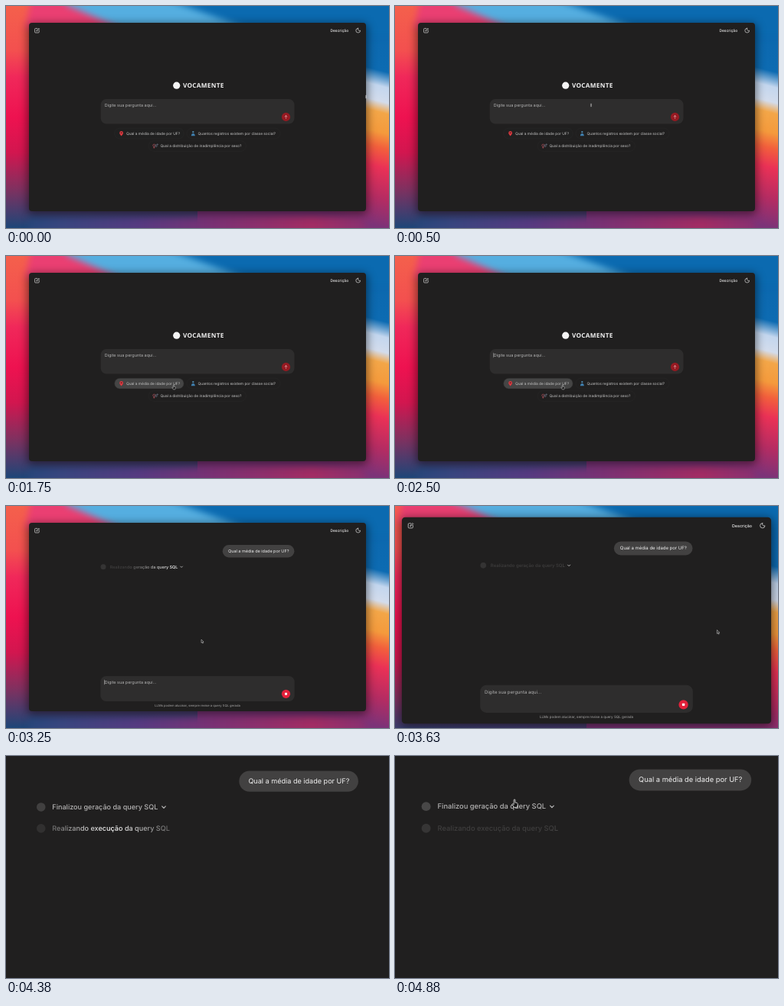
An HTML page for the animation above (5010 ms loop, 500 by 291 pixels).

```html
<!DOCTYPE html>
<html lang="pt-BR">
<head>
<meta charset="utf-8">
<title>Chat</title>
<style>
  html, body { margin: 0; width: 100%; height: 100%; overflow: hidden; background: #201f1f; }
  svg { display: block; width: 100%; height: 100%; overflow: hidden; fill: none; }
  text { font: 5.47px Inter, sans-serif; text-rendering: geometricPrecision; fill: #f0f0f0; white-space: pre; }
  .chip text { font-size: 4.83px; fill: #c6c6c6; }
  .chip rect { fill: #201f1f; stroke: #2b2a2a; stroke-width: .5; }
  .hint { fill: #b2b2b2; }
  .status { font-weight: 500; }
  .line { stroke: #d8d8d8; stroke-width: .7; stroke-linecap: round; stroke-linejoin: round; }
  .box { fill: #2e2d2d; }
  .soft { filter: blur(4px); }
  .shadow { filter: blur(6px); }
  #mouse path { stroke-linejoin: round; }
</style>
</head>
<body>
<svg viewBox="0 0 500 291">
  <defs>
    <linearGradient id="left" gradientUnits="userSpaceOnUse" x1="0" y1="0" x2="0" y2="291">
      <stop offset="0" stop-color="#f4604c"/>
      <stop offset=".2" stop-color="#f3504f"/>
      <stop offset=".32" stop-color="#f0285a"/>
      <stop offset=".5" stop-color="#ee1250"/>
      <stop offset=".66" stop-color="#d2164f"/>
      <stop offset=".82" stop-color="#82305f"/>
      <stop offset="1" stop-color="#1d4678"/>
    </linearGradient>
    <linearGradient id="right" gradientUnits="userSpaceOnUse" x1="485" y1="0" x2="415" y2="270">
      <stop offset="0" stop-color="#0b66ac"/>
      <stop offset=".29" stop-color="#0d6bb2"/>
      <stop offset=".36" stop-color="#c3d6ee"/>
      <stop offset=".43" stop-color="#d3dcec"/>
      <stop offset=".48" stop-color="#f3a648"/>
      <stop offset=".57" stop-color="#f49a3c"/>
      <stop offset=".64" stop-color="#f2603c"/>
      <stop offset=".73" stop-color="#ea3156"/>
      <stop offset=".87" stop-color="#b52c62"/>
      <stop offset="1" stop-color="#7c3378"/>
    </linearGradient>
    <linearGradient id="bottom" gradientUnits="userSpaceOnUse" x1="0" y1="0" x2="500" y2="0">
      <stop offset="0" stop-color="#1d4678"/>
      <stop offset=".15" stop-color="#39457f"/>
      <stop offset=".35" stop-color="#563a80"/>
      <stop offset=".55" stop-color="#7b3173"/>
      <stop offset=".8" stop-color="#a22c63"/>
      <stop offset="1" stop-color="#7c3378"/>
    </linearGradient>
    <linearGradient id="shine">
      <stop offset="0" stop-color="#3e3d3d"/>
      <stop offset=".5" stop-color="#fff"/>
      <stop offset="1" stop-color="#3e3d3d"/>
    </linearGradient>
  </defs>

  <g id="cam">
    <path d="M-20-20h270v331h-270z" fill="url(#left)"/>
    <path d="M250-20h270v331h-270z" fill="url(#right)"/>
    <g class="soft">
      <path d="M30 276h440v40h-440z" fill="url(#bottom)"/>
      <path d="M35-20h80l50 50H25z" fill="#ea3f72"/>
      <path d="M60-20L82 0l70 30h200V-20z" fill="#55aee0"/>
      <path d="M180-20L310 28l160 12h50v-60z" fill="#0b6ab0"/>
    </g>
    <rect class="shadow" x="28" y="23" width="444" height="250" rx="6" fill="#000" fill-opacity=".5"/>
    <rect x="30" y="22" width="440" height="247" rx="4" fill="#201f1f"/>

    <g class="line">
      <path d="M40.6 29.4h-2a1 1 0 0 0-1 1v3.6a1 1 0 0 0 1 1h3.6a1 1 0 0 0 1-1v-2"/>
      <path d="M40 32.7l.3-1.2 2.4-2.4.9.9-2.4 2.4z"/>
      <path d="M459.6 29.2a2.3 2.3 0 0 0 3 3 2.9 2.9 0 1 1-3-3z"/>
    </g>
    <text x="423.4" y="33.8" style="font-size:4.92px;font-weight:500">Descrição</text>

    <g id="home">
      <circle cx="222.7" cy="104.2" r="4.6" fill="#f4f4f4"/>
      <text x="231" y="107.1" style="font:600 8.2px 'Noto Sans',sans-serif;letter-spacing:.3px">VOCAMENTE</text>
      <rect class="box" x="123.7" y="122" width="252.8" height="32.4" rx="7.5"/>
      <text class="hint" x="128.7" y="131.8">Digite sua pergunta aqui...</text>
      <path id="caretA" d="M128.6 126.8v6.4" stroke="#bbb" stroke-width=".5"/>
      <circle cx="365.5" cy="145.4" r="5.6" fill="#961a22"/>
      <path d="M365.5 147.4v-3.8m-1.6 1.5l1.6-1.6 1.6 1.6" class="line" style="stroke:#e2a3a6"/>

      <g class="chip">
        <rect id="hover" x="141.6" y="160.2" width="90.6" height="13.8" rx="6.9"/>
        <path d="M150.6 170.6c-.5-1.5-2.4-2.4-2.4-4.2a2.4 2.4 0 0 1 4.8 0c0 1.8-1.9 2.7-2.4 4.2z" fill="#dd3a40"/>
        <circle cx="150.6" cy="166.3" r="1" fill="#6e2226"/>
        <text x="157" y="168.9">Qual a média de idade por UF?</text>
      </g>
      <g class="chip">
        <rect x="236" y="160.2" width="122" height="13.8" rx="6.9"/>
        <circle cx="244.3" cy="165.1" r="1.2" fill="#4f86a8"/>
        <path d="M241.8 170.2q.4-3.3 2.5-3.3t2.5 3.3z" fill="#3f7fae"/>
        <text x="250.6" y="168.9">Quantos registros existem por classe social?</text>
      </g>
      <g class="chip">
        <rect x="186" y="176.8" width="127.4" height="13.6" rx="6.8"/>
        <g stroke-width=".7">
          <path d="M193.3 184.2v2.4m-1-1h2" stroke="#b5525c"/>
          <circle cx="193.3" cy="182.7" r="1.5" stroke="#b5525c"/>
          <circle cx="196" cy="183.2" r="1.3" stroke="#6f7688"/>
          <path d="M197 182.2l1.2-1.2m-1.1 0h1.1v1.1" stroke="#6f7688"/>
        </g>
        <text x="201.4" y="185.3">Qual a distribuição de inadimplência por sexo?</text>
      </g>
    </g>

    <g id="chat">
      <rect x="282.7" y="51.1" width="93.7" height="16.4" rx="8.2" fill="#424141"/>
      <text x="290" y="61.1">Qual a média de idade por UF?</text>
      <circle id="dotA" cx="127" cy="79.7" r="3.5" fill="#fff"/>
      <g id="running">
        <text class="status" x="135.8" y="81.6" style="fill:url(#shine)">Realizando geração da query SQL</text>
        <path class="line" d="M227.7 79.1l1.4 1.4 1.4-1.4"/>
      </g>
      <g id="done">
        <text class="status" x="135.8" y="81.6" style="fill:#b4b3b3">Finalizou geração da query SQL</text>
        <path class="line" d="M222.1 79.1l1.4 1.4 1.4-1.4" style="stroke:#b4b3b3"/>
        <circle id="dotB" cx="127" cy="96.5" r="3.5" fill="#fff"/>
        <text class="status" x="135.8" y="98.3" style="fill:url(#shine)">Realizando execução da query SQL</text>
      </g>
      <rect class="box" x="123.3" y="223" width="253.4" height="32.9" rx="7.5"/>
      <text class="hint" x="128.7" y="232.8">Digite sua pergunta aqui...</text>
      <path id="caretB" d="M128.6 227.8v6.4" stroke="#ddd" stroke-width=".5"/>
      <circle cx="365.5" cy="246.3" r="5.6" fill="#e3213b"/>
      <rect x="364" y="244.8" width="3" height="3" rx=".5" fill="#fff"/>
      <text x="250" y="262.8" text-anchor="middle" style="font-size:4.14px;fill:#a9a8a8">LLMs podem alucinar, sempre revise a query SQL gerada</text>
    </g>

    <g id="mouse" stroke="#ddd" stroke-width=".5" fill="#161616">
      <path id="arrow" d="M0 0v4.3l1-.9.7 1.6.8-.4-.7-1.5h1.3z"/>
      <path id="beam" fill="none" d="M-.7-1.8q.7 0 .7.5v2.6q0 .5-.7.5m1.4 0q-.7 0-.7-.5v-2.6q0-.5.7-.5"/>
      <path id="hand" d="M-.7-2.6q0-.7.5-.7t.5.7v1.8q1.9 0 2 .9 0 1.6-.6 2.8h-2.3q-.7-1.4-1.6-2.4.1-.9 1.5.2z"/>
    </g>
  </g>
</svg>
<script>
const LOOP = 5010, STEP = 125, CHAT = 2625, ZOOM = 3497, DONE = 3875;
const $ = id => document.getElementById(id);
const show = (id, on) => $(id).style.display = on ? '' : 'none';
const smooth = p => p * p * (3 - 2 * p);
const clamp = p => Math.min(1, Math.max(0, p));

// Linear track of [time, ...values] rows
function track(rows, t) {
  let i = 0;
  while (i < rows.length - 2 && t >= rows[i + 1][0]) i++;
  const [t0, ...a] = rows[i], [t1, ...b] = rows[i + 1];
  const p = clamp((t - t0) / (t1 - t0));
  return a.map((v, j) => v + (b[j] - v) * p);
}

const path = [
  [0, 470, 119], [250, 345, 126], [500, 256, 130], [1125, 250, 130.5],
  [1250, 232, 153], [1500, 221, 168], [1750, 219, 172], [3000, 219, 172], [3250, 255, 175],
  [3375, 305, 171], [3625, 405.5, 157], [3875, 442, 150], [4375, 442, 110],
  [4625, 262, 80], [4750, 212, 77], [4875, 195, 77.5]
];
const pulseA = [[2625, .1], [3625, .09], [3875, .09], [4375, .15], [4875, .18]];
const pulseB = [[3875, .2], [4375, .08], [4875, .1]];

// Critically damped spring
function spring(ms) {
  const x = Math.max(0, ms) * .005;
  return 1 - (1 + x) * Math.exp(-x);
}

function cursor(t) {
  if (t >= 4625) return 'hand';
  if (t >= CHAT) return 'arrow';
  return t >= 1375 ? 'hand' : 'beam';
}

function draw(t) {
  const chat = t >= CHAT, done = t >= DONE;
  const zoom = 1 + .708 * spring(t - ZOOM);
  $('cam').setAttribute('transform', `translate(250 99) scale(${zoom}) translate(-250 -99)`);
  show('home', !chat);
  show('chat', chat);
  show('running', !done);
  show('done', done);
  show('caretA', t >= 2500);
  show('caretB', t >= 2875 && Math.floor((t - 2875) / 500) % 2 === 0);

  const grey = track([[1375, 32], [1625, 69]], t)[0];
  $('hover').style.fill = `rgb(${grey},${grey},${grey})`;

  const mid = -.6 + 2.2 * smooth(clamp((t - (done ? DONE : CHAT)) / 1000));
  $('shine').setAttribute('x1', mid - .65);
  $('shine').setAttribute('x2', mid + .65);
  $('dotA').setAttribute('fill-opacity', track(pulseA, t)[0]);
  $('dotB').setAttribute('fill-opacity', track(pulseB, t)[0]);

  const kind = cursor(t);
  for (const id of ['arrow', 'beam', 'hand']) show(id, id === kind);
  $('mouse').setAttribute('transform', `translate(${track(path, t)})`);
}

// The picture advances eight times a second
let last = -1;
function tick() {
  const t = performance.now() % LOOP;
  const step = Math.min(39, Math.floor(Math.floor(t / 10) / 12.5));
  if (step !== last) draw((last = step) * STEP);
  requestAnimationFrame(tick);
}
tick();
</script>
</body>
</html>
```
